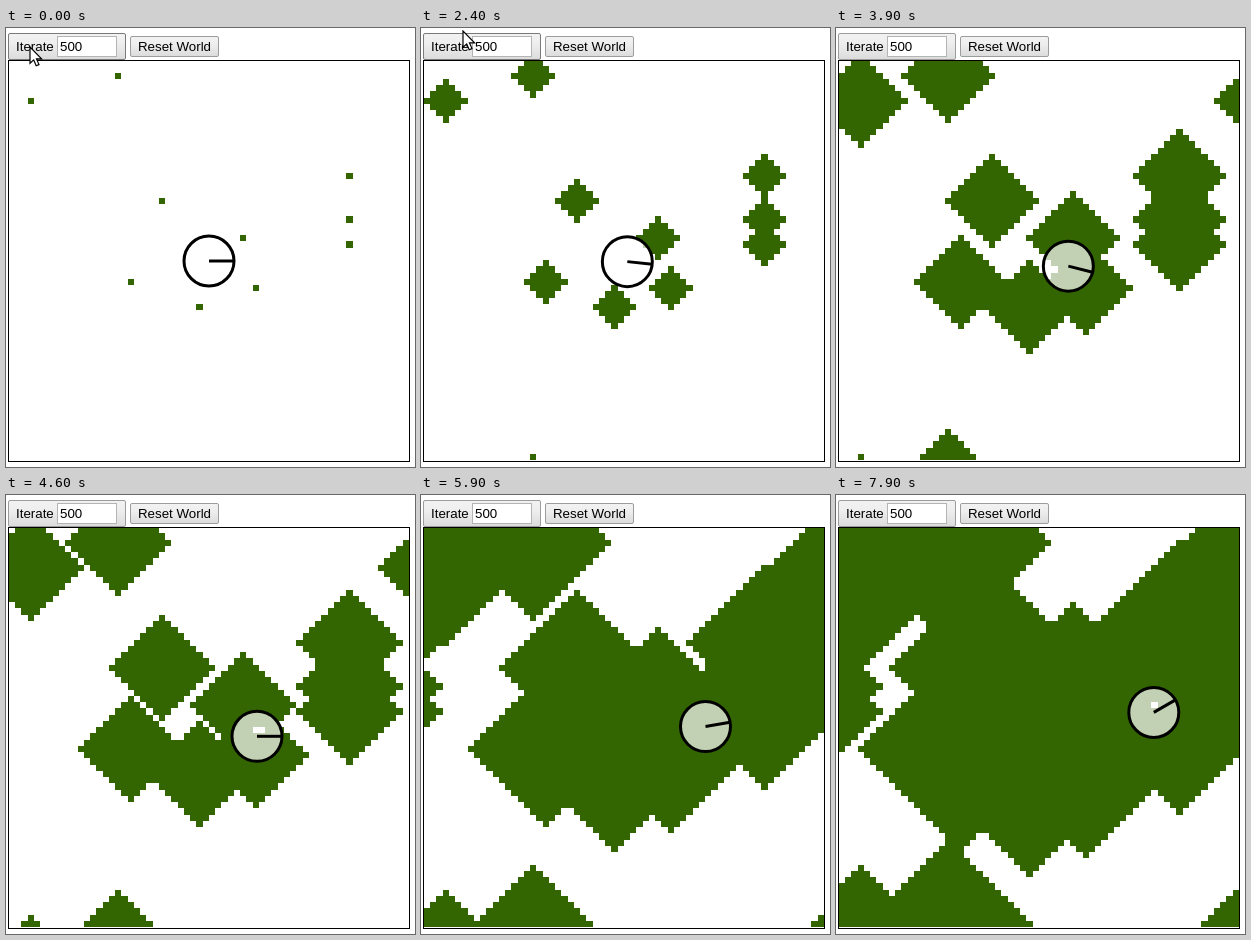
Recreate the animation shown at these times as an HTML page with a canvas. Size 409x439 px, loop 8000 ms.

```html
<!DOCTYPE html>
<html lang="en">
<head>
<meta charset="utf-8">
<title>Grass world</title>
<style>
  html, body { margin: 0; width: 100%; height: 100%; overflow: hidden; background: #fff; }
  body { position: relative; font: 13.333px/19px "Liberation Sans", Arial, sans-serif; color: #000; }
  canvas, svg { position: absolute; left: 0; top: 0; display: block; }
  div { position: absolute; box-sizing: border-box; white-space: nowrap; }
  .btn {
    border: 1px solid #9c9c9c; border-radius: 2px;
    background: linear-gradient(#f2f2f2, #eee 38%, #dcdcdc);
  }
  #iterate { left: 2px; top: 5px; width: 118px; height: 27px; padding: 3px 7px; }
  #iterate.hover { border-color: #7a7a7a; }
  #iterate.down { border-color: #7a7a7a; background: linear-gradient(#d6d6d6, #e6e6e6); }
  #count { left: 51px; top: 8px; width: 60px; height: 21px; padding-left: 2px; border: 1px solid #b4b4b4; background: #fff; }
  #reset { left: 124px; top: 8px; width: 89px; height: 21px; text-align: center; }
</style>
</head>
<body>
<canvas id="world" width="409" height="439"></canvas>
<div id="iterate" class="btn">Iterate</div>
<div id="count">500</div>
<div id="reset" class="btn">Reset World</div>
<svg id="cursor" width="15" height="21" viewBox="-1 -1 15 21">
  <path d="M0 0V16.3L3.7 12.9L6.2 18.8L9 17.6L6.5 11.9H11.6Z" fill="#fff" stroke="#000" stroke-width="1.2"/>
</svg>
<script>
const LOOP = 8000, TICK = 100;
const GRID = 64, CELL = 6.25, LEFT = 2.9, TOP = 32;
const FIRST_GROWTH = 1340, GROWTH = 412;
const FIRST_MOVE = 1900, RADIUS = 25;

const seeds = [[3, 6], [17, 2], [24, 22], [37, 28], [39, 36], [30, 39], [19, 35], [54, 18], [54, 25], [54, 29]];

// key poses: time, x, y
const route = [
  [FIRST_MOVE, 203, 233], [3100, 211, 234.5], [4600, 251, 241.3],
  [5900, 284.5, 231.6], [7900, 317.8, 217.4]
];
// time, degrees
const heading = [[1000, 0], [1200, 11], [1700, -18], [3100, 30], [4600, 0], [5900, -10], [6700, -30]];

const $ = id => document.getElementById(id);
const ctx = $("world").getContext("2d");
const iterate = $("iterate"), cursor = $("cursor");

const clamp01 = k => Math.min(1, Math.max(0, k));

// linear interpolation between timed keys
function sample(keys, t) {
  const next = keys.findIndex(key => key[0] >= t);
  if (next === 0) return keys[0].slice(1);
  if (next < 0) return keys[keys.length - 1].slice(1);
  const [a, b] = [keys[next - 1], keys[next]];
  const k = (t - a[0]) / (b[0] - a[0]);
  return a.slice(1).map((v, i) => v + (b[i + 1] - v) * k);
}

// the display ticks, and stalls twice
function shownTime(t) {
  const tick = Math.floor(t / TICK) * TICK;
  if (tick > 4700 && tick < 5300) return 4700;
  if (tick > 7100 && tick < 7500) return 7100;
  return tick;
}

function wrapDist(a, b) {
  const d = Math.abs(a - b);
  return Math.min(d, GRID - d);
}

// cells grazed since the last growth step
function grazed(t, radius) {
  const cells = new Set();
  const since = FIRST_GROWTH + (radius - 1) * GROWTH + 150;
  for (let s = Math.max(since, FIRST_MOVE); s <= t; s += 10) {
    const [x, y] = sample(route, s);
    const col = Math.floor((x + 3.4 - LEFT) / CELL);
    const row = Math.floor((y - 6 - TOP) / CELL);
    cells.add(col + GRID * row);
  }
  return cells;
}

function drawGrass(t) {
  const radius = Math.max(0, Math.floor((t - FIRST_GROWTH) / GROWTH) + 1);
  const eaten = grazed(t, radius);
  const isGrass = (col, row) =>
    !eaten.has(col + GRID * row) &&
    seeds.some(([x, y]) => wrapDist(x, col) + wrapDist(y, row) <= radius);
  const edgeX = i => Math.round(LEFT + i * CELL);
  const edgeY = i => Math.round(TOP + i * CELL);

  ctx.fillStyle = "#336600";
  for (let row = 0; row < GRID; row++) {
    for (let col = 0; col < GRID; col++) {
      if (!isGrass(col, row)) continue;
      const x = edgeX(col), y = edgeY(row);
      ctx.fillRect(x, y, edgeX(col + 1) - x, edgeY(row + 1) - y);
    }
  }
}

function drawRobot(t) {
  const [x, y] = sample(route, t);
  const angle = sample(heading, t)[0] * Math.PI / 180;
  ctx.lineWidth = 3;
  ctx.strokeStyle = "#000";
  ctx.fillStyle = "rgba(255,255,255,0.7)";
  ctx.beginPath();
  ctx.arc(x, y, RADIUS, 0, Math.PI * 2);
  ctx.fill();
  ctx.stroke();
  ctx.beginPath();
  ctx.moveTo(x, y);
  ctx.lineTo(x + RADIUS * Math.cos(angle), y + RADIUS * Math.sin(angle));
  ctx.stroke();
}

function drawControls(t) {
  const state = t >= 700 && t < 900 ? "down" : t < 2600 ? "hover" : "";
  iterate.className = `btn ${state}`;

  // the pointer drifts up and out of the stage
  const approach = clamp01((t - 1500) / 200), leave = clamp01((t - 1700) / 900);
  const x = 24 + 7 * approach + 14 * leave;
  const y = 19 - 7 * approach - 12 * leave;
  cursor.style.transform = `translate(${Math.round(x) - 1}px, ${Math.round(y) - 1}px)`;
  cursor.style.visibility = t < 2700 ? "visible" : "hidden";
}

function draw(t) {
  ctx.fillStyle = "#fff";
  ctx.fillRect(0, 0, 409, 439);
  ctx.save();
  ctx.beginPath();
  ctx.rect(3, 33, 400, 400);
  ctx.clip();
  drawGrass(t);
  drawRobot(t);
  ctx.restore();
  ctx.lineWidth = 1;
  ctx.strokeStyle = "#000";
  ctx.strokeRect(2.5, 32.5, 401, 401);
  drawControls(t);
}

const start = performance.now();
function frame() {
  draw(shownTime((performance.now() - start) % LOOP));
  requestAnimationFrame(frame);
}
frame();
</script>
</body>
</html>
```
